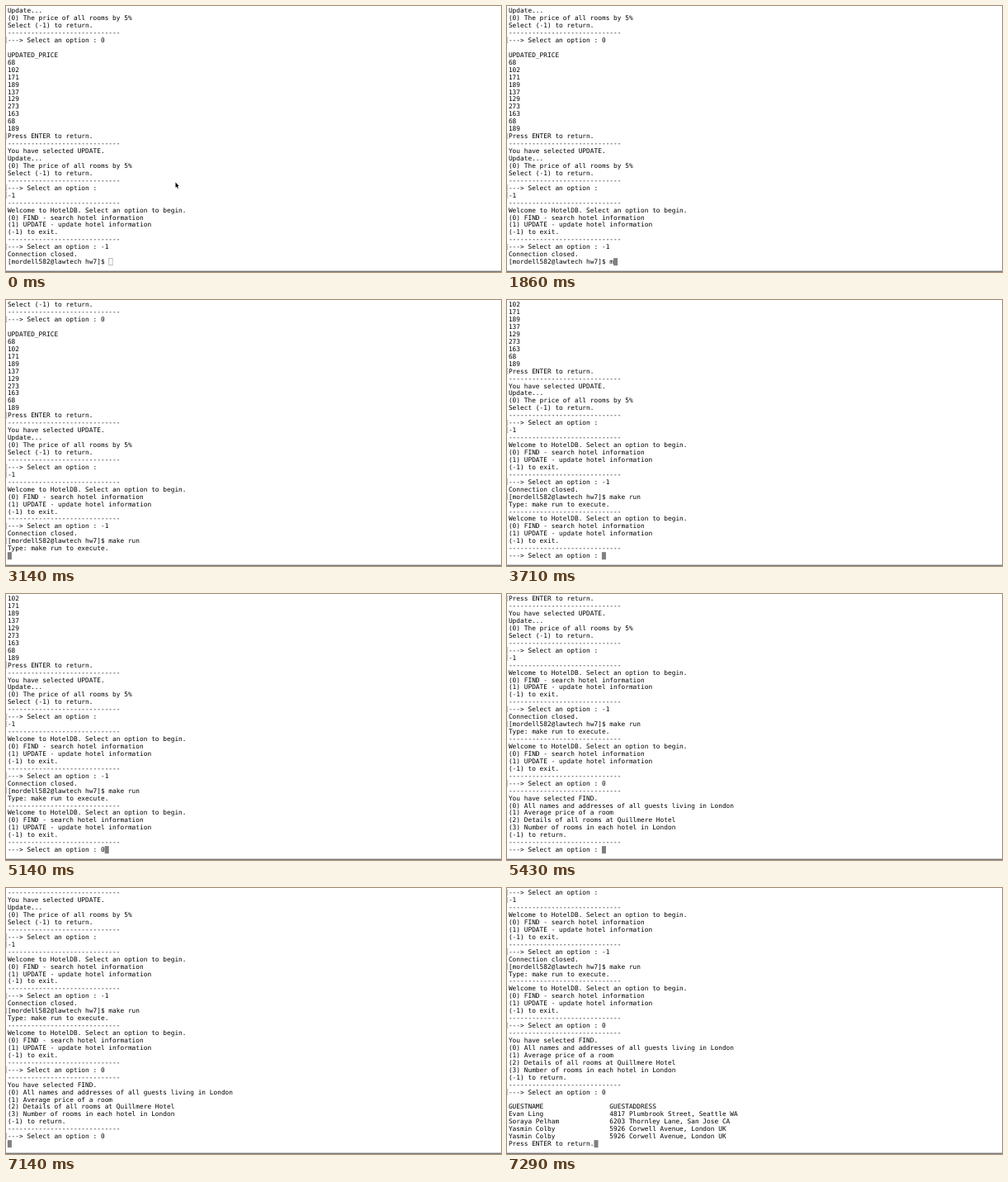
Animation, 600 px wide and 322 px high, one loop 8 s. Source, as an HTML page with a canvas:

```html
<!DOCTYPE html>
<html lang="en">
<head>
<meta charset="utf-8">
<title>Terminal session</title>
<style>
  html, body { margin: 0; width: 100%; height: 100%; overflow: hidden; background: #fff; }
  canvas { display: block; }
</style>
</head>
<body>
<canvas id="stage" width="600" height="322"></canvas>
<script>
const ctx = document.getElementById('stage').getContext('2d');
const LOOP = 8000;
const ROWS = 35;
const LEFT = 1.9, COL = 4.71, LINE = 8.94, BASE = 8.2;
const FONT_SIZE = COL / 0.602;

const rule = '-'.repeat(29);
const ask = '---> Select an option :';
const prompt = '[mordell582@lawtech hw7]$ ';
const updateMenu = ['Update...', '(0) The price of all rooms by 5%', 'Select (-1) to return.', rule];
const mainMenu = [
  rule,
  'Welcome to HotelDB. Select an option to begin.',
  '(0) FIND - search hotel information',
  '(1) UPDATE - update hotel information',
  '(-1) to exit.',
  rule
];
const guest = (name, address) => name.padEnd(26) + address;

const log = [
  ...updateMenu,
  ask + ' 0',
  '',
  'UPDATED_PRICE',
  ...[68, 102, 171, 189, 137, 129, 273, 163, 68, 189].map(String),
  'Press ENTER to return.',
  rule,
  'You have selected UPDATE.',
  ...updateMenu,
  ask,
  '-1',
  ...mainMenu,
  ask + ' -1',
  'Connection closed.',
  prompt + 'make run',
  'Type: make run to execute.',
  ...mainMenu,
  ask + ' 0',
  rule,
  'You have selected FIND.',
  '(0) All names and addresses of all guests living in London',
  '(1) Average price of a room',
  '(2) Details of all rooms at Quillmere Hotel',
  '(3) Number of rooms in each hotel in London',
  '(-1) to return.',
  rule,
  ask + ' 0',
  '',
  guest('GUESTNAME', 'GUESTADDRESS'),
  guest('Evan Ling', '4817 Plumbrook Street, Seattle WA'),
  guest('Soraya Pelham', '6203 Thornley Lane, San Jose CA'),
  guest('Yasmin Colby', '5926 Corwell Avenue, London UK'),
  guest('Yasmin Colby', '5926 Corwell Avenue, London UK'),
  'Press ENTER to return.'
];

// Start time, last row on screen, characters in it, whether it is marked as entered
const steps = [
  [0, 34, 26], [1860, 34, 27], [2000, 34, 28], [2140, 34, 29], [2290, 34, 30],
  [2430, 34, 31], [2710, 34, 32], [2860, 34, 34],
  [3140, 36, 0], [3710, 42, 24], [5140, 42, 25], [5290, 42, 25, true],
  [5430, 51, 24], [6710, 51, 25], [7000, 51, 25, true],
  [7140, 52, 0], [7290, 58, 22]
];
const isInput = text => /^(--->|Press|-1$|\[)/.test(text);

function drawText(text, y) {
  ctx.save();
  ctx.translate(LEFT, y + BASE);
  // Large type scaled down keeps fractional character widths
  ctx.scale(0.1, 0.1);
  ctx.font = `${FONT_SIZE * 10}px "DejaVu Sans Mono", monospace`;
  ctx.textRendering = 'geometricPrecision';
  ctx.fillStyle = '#000';
  ctx.fillText(text, 0, 0);
  ctx.restore();
}

function drawMark(y) {
  ctx.fillStyle = '#b4b4b4';
  ctx.fillRect(0, y + 2, 0.8, 7);
  ctx.fillRect(0, y + 2, 1.7, 0.6);
  ctx.fillRect(0, y + 8.4, 1.7, 0.6);
}

function drawCursor(chars, y, focused) {
  const x = LEFT + chars * COL;
  if (focused) {
    ctx.fillStyle = '#7f7f7f';
    ctx.fillRect(x, y + 1.2, COL + 0.3, 9);
  } else {
    ctx.strokeStyle = '#a0a0a0';
    ctx.lineWidth = 0.7;
    ctx.strokeRect(x + 0.4, y + 1.6, COL - 0.4, 8.2);
  }
}

function drawArrow(x, y) {
  const points = [[0, 0], [0, 6.3], [1.4, 5], [2.4, 7.4], [3.4, 7], [2.4, 4.7], [4.3, 4.6]];
  ctx.beginPath();
  points.forEach(([dx, dy]) => ctx.lineTo(x + dx, y + dy));
  ctx.closePath();
  ctx.fillStyle = '#000';
  ctx.fill();
}

function drawBeam(x, y) {
  ctx.beginPath();
  ctx.moveTo(x - 1.6, y - 4.2);
  ctx.quadraticCurveTo(x, y - 4.2, x, y - 3);
  ctx.lineTo(x, y + 3);
  ctx.quadraticCurveTo(x, y + 4.2, x - 1.6, y + 4.2);
  ctx.moveTo(x + 1.6, y - 4.2);
  ctx.quadraticCurveTo(x, y - 4.2, x, y - 3);
  ctx.moveTo(x, y + 3);
  ctx.quadraticCurveTo(x, y + 4.2, x + 1.6, y + 4.2);
  ctx.strokeStyle = '#222';
  ctx.lineWidth = 0.7;
  ctx.stroke();
}

function draw(t) {
  const [, last, chars, entered] = steps.filter(step => step[0] <= t).pop();
  ctx.fillStyle = '#fff';
  ctx.fillRect(0, 0, 600, 322);

  for (let i = 0; i < ROWS; i++) {
    const row = last - ROWS + 1 + i;
    const y = i * LINE;
    const current = row === last;
    const text = current ? log[row].slice(0, chars) : log[row];
    if (current ? entered : isInput(text)) drawMark(y);
    if (current) drawCursor(chars, y, t >= 1140);
    drawText(text, y);
  }

  if (t < 1000) drawArrow(205.5, 213.5);
  else if (t < 1860) drawBeam(205.2, 213.7);

  ctx.fillStyle = '#c8c8c8';
  ctx.fillRect(0, 320, 600, 1);
  ctx.fillStyle = '#777';
  ctx.fillRect(0, 321, 600, 1);
}

const start = performance.now();
function frame() {
  draw((performance.now() - start) % LOOP);
  requestAnimationFrame(frame);
}
frame();
</script>
</body>
</html>
```
